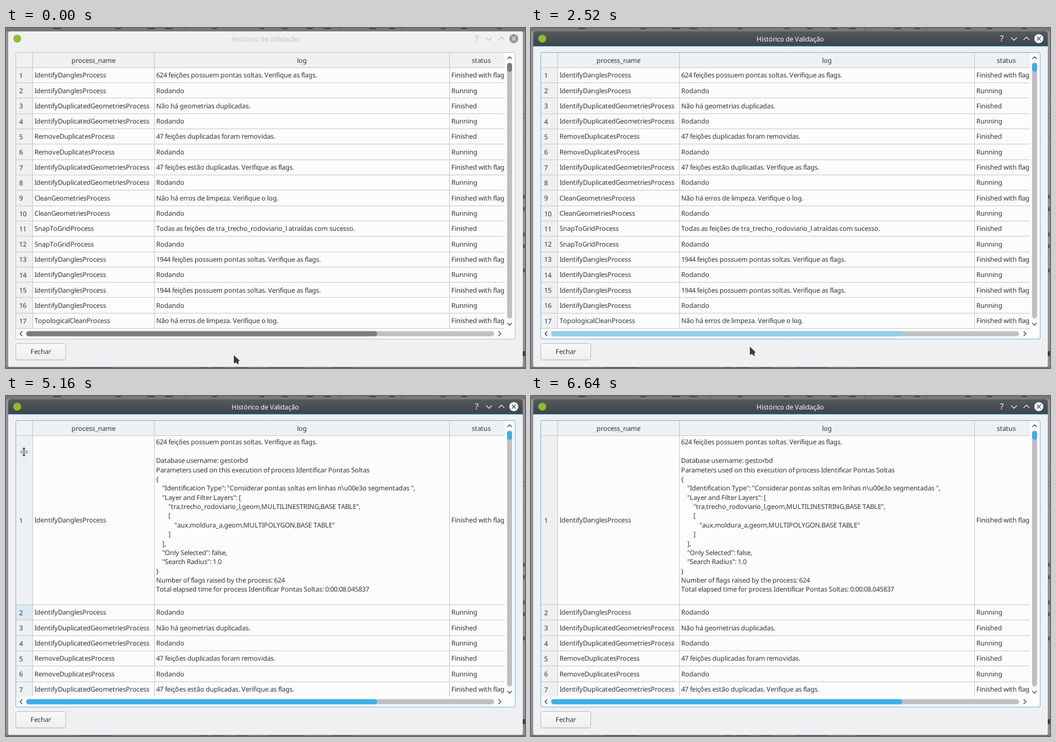
An HTML page with a canvas for the animation above (9640 ms loop, 925 px wide and 605 px high).

```html
<!DOCTYPE html>
<html lang="pt-BR">
<head>
<meta charset="utf-8">
<title>Histórico de Validação</title>
<style>
html, body { margin: 0; width: 100%; height: 100%; overflow: hidden; background: #8f9092; }
canvas { display: block; }
</style>
</head>
<body>
<canvas id="stage" width="925" height="605"></canvas>
<script>
const ctx = document.getElementById('stage').getContext('2d');
const LOOP = 9640, TICK = 40, ROW = 27.31, TOP = 70.3, TALL = 301.2, LINE = 16.38;
const ZOOM = 0.91, FONT = '13px "Noto Sans", sans-serif';
const INK = '#31363b', GRID = '#c6c7c8', BASE = '#fcfcfc', PANEL = '#eff0f1';
const GREY = [123, 124, 126], BLUE = [61, 174, 233], PALE = [147, 206, 233];

const columns = [
  { name: 'process_name', x: 48, w: 217 },
  { name: 'log', x: 265, w: 526 },
  { name: 'status', x: 791, w: 113 },
  { name: 'finished', x: 904, w: 101 }
];
const PAN = 116;                       // horizontal scroll distance

const dangles = 'IdentifyDangles', dupes = 'IdentifyDuplicatedGeometries',
  remove = 'RemoveDuplicates', clean = 'CleanGeometries', snap = 'SnapToGrid';
const FLAGS = 'Finished with flags', DONE = 'Finished';
const clear = 'Não há erros de limpeza. Verifique o log.';
const loose = n => n + ' feições possuem pontas soltas. Verifique as flags.';
const jobs = [
  [dangles, loose(624), FLAGS],
  [dupes, 'Não há geometrias duplicadas.', DONE],
  [remove, '47 feições duplicadas foram removidas.', DONE],
  [dupes, '47 feições estão duplicadas. Verifique as flags.', FLAGS],
  [clean, clear, FLAGS],
  [snap, 'Todas as feições de tra_trecho_rodoviario_l atraídas com sucesso.', DONE],
  [dangles, loose(1944), FLAGS],
  [dangles, loose(1944), FLAGS],
  ['TopologicalClean', clear, FLAGS]
];
const rows = jobs.flatMap(([job, log, status], i) => {
  const name = job + 'Process', date = '08/03/2017 10:' + (52 - i * 2);
  return [[name, log, status, date], [name, 'Rodando', 'Running', date]];
}).slice(0, 17);

const details = String.raw`${loose(624)}

Database username: gestorbd
Parameters used on this execution of process Identificar Pontas Soltas
{
    "Identification Type": "Considerar pontas soltas em linhas n\u00e3o segmentadas ",
    "Layer and Filter Layers": [
        "tra,trecho_rodoviario_l,geom,MULTILINESTRING,BASE TABLE",
        [
            "aux,moldura_a,geom,MULTIPOLYGON,BASE TABLE"
        ]
    ],
    "Only Selected": false,
    "Search Radius": 1.0
}
Number of flags raised by the process: 624
Total elapsed time for process Identificar Pontas Soltas: 0:00:08.045837`.split('\n');

// Pointer path: time, x, y, steady speed
const path = [
  [0, 406, 582], [240, 406, 582], [880, 423, 544], [1200, 423, 544], [1840, 650, 562],
  [2080, 650, 562], [2520, 390, 567], [2720, 390, 567], [3240, -13, 205], [3360, -13, 161],
  [3840, 32, 99], [5720, 32, 99], [5760, 33, 101], [5880, 80, 130], [6040, 80, 130],
  [6320, 333, 271, 1], [6640, 420, 620, 1], [LOOP, 420, 620]
];

const clamp = v => Math.max(0, Math.min(1, v));
const fade = (t, start) => clamp((t - start) / 150);
const mix = (a, b, p) => a.map((v, i) => v + (b[i] - v) * p);
const rgb = c => `rgb(${c.map(Math.round)})`;

function pointerAt(t) {
  const i = path.findIndex(k => k[0] > t);
  const [t0, x0, y0] = path[i - 1], [t1, x1, y1, steady] = path[i];
  let p = (t - t0) / (t1 - t0);
  if (!steady) p = p * p * (3 - 2 * p);
  return [x0 + (x1 - x0) * p, y0 + (y1 - y0) * p];
}

function rect(x, y, w, h, color) {
  ctx.fillStyle = color;
  ctx.fillRect(x, y, w, h);
}

function round(x, y, w, h, r, fill, stroke) {
  ctx.beginPath();
  ctx.roundRect(x, y, w, h, r);
  if (fill) { ctx.fillStyle = fill; ctx.fill(); }
  if (stroke) { ctx.strokeStyle = stroke; ctx.lineWidth = 1; ctx.stroke(); }
}

// Hinted desktop text: every glyph advances by whole pixels before zooming
const advances = {};
const advance = ch => advances[ch] ??= Math.round(ctx.measureText(ch).width);

// y is the middle of the capitals
function text(s, x, y, centered = false, color = INK) {
  const glyphs = [...String(s)];
  let dx = centered ? -glyphs.reduce((sum, ch) => sum + advance(ch), 0) / 2 : 0;
  ctx.save();
  ctx.translate(x, y + 4.1);
  ctx.scale(ZOOM, ZOOM);
  ctx.fillStyle = color;
  for (const ch of glyphs) {
    ctx.fillText(ch, dx, 0);
    dx += advance(ch);
  }
  ctx.restore();
}

function lines(points, color, width = 1.2) {
  ctx.beginPath();
  points.forEach(([x, y], i) => i ? ctx.lineTo(x, y) : ctx.moveTo(x, y));
  ctx.strokeStyle = color;
  ctx.lineWidth = width;
  ctx.stroke();
}

function chevron(x, y, dx, dy, size, color) {
  const h = size / 2;
  lines([[x - dx * h - dy * size, y - dy * h - dx * size], [x + dx * h, y + dy * h],
    [x - dx * h + dy * size, y - dy * h + dx * size]], color);
}

function backdrop() {
  rect(0, 0, 925, 605, '#929394');
  rect(0, 0, 925, 6, '#777879');
  for (const [x, w] of [[84, 14], [195, 10], [252, 14], [283, 14], [368, 8], [452, 8],
    [492, 10], [535, 12], [567, 12], [648, 12], [683, 10], [775, 8], [812, 10], [875, 8]])
    rect(x, 0, w, 2, '#444648');
  for (const x of [319, 594, 704]) rect(x, 0, 1, 5, '#555');
  for (const y of [126, 152, 160, 194]) rect(921, y, 4, 1, '#777');
  for (const y of [297, 319, 364, 385, 428]) rect(922, y, 2, 7, '#444');
  rect(921, 575, 4, 9, '#3c3d3e');
  rect(0, 603, 925, 2, '#77777a');
  for (const [x, w] of [[130, 60], [344, 14], [368, 22], [410, 20], [470, 60], [580, 40]])
    rect(x, 604, w, 1, '#754661');
}

function titleBar(t) {
  const on = fade(t, 1070);
  const tone = (a, b) => rgb(mix(a, b, on));
  const bar = ctx.createLinearGradient(0, 6, 0, 32);
  bar.addColorStop(0, tone([239, 240, 241], [83, 90, 96]));
  bar.addColorStop(1, tone([239, 240, 241], [61, 68, 74]));
  round(4, 6, 917, 597, [4, 4, 3, 3], PANEL);
  round(4, 6, 917, 26, [4, 4, 0, 0], bar);
  rect(4, 32, 917, 1, tone([239, 240, 241], BLUE));
  round(13, 12, 14, 14, 7, '#8fbf26');
  const glyph = tone([184, 188, 191], [252, 252, 252]);
  text('Histórico de Validação', 462, 19.5, true, tone([192, 195, 197], [252, 252, 252]));
  ctx.save();
  ctx.font = '15px "Noto Sans", sans-serif';
  ctx.textAlign = 'center';
  ctx.fillStyle = glyph;
  ctx.fillText('?', 839, 24.4);
  ctx.restore();
  chevron(861, 19.5, 0, 1, 5, glyph);
  chevron(883, 18.5, 0, -1, 5, glyph);
  round(897, 11, 16, 16, 8, tone([146, 150, 153], [252, 252, 252]));
  const cross = tone([239, 240, 241], [66, 73, 79]);
  lines([[901.5, 15.5], [908.5, 22.5]], cross);
  lines([[908.5, 15.5], [901.5, 22.5]], cross);
}

function table(t, [px, py], pan) {
  const open = t >= 5160, dragging = t >= 1120 && t < 2760;
  const inside = !dragging && px >= 18 && px < 889 && py >= TOP && py < 535;
  const staleHead = t >= 5160 && t < 5800;

  ctx.save();
  ctx.beginPath();
  ctx.rect(18, 44, 871, 491);
  ctx.clip();
  rect(18, 44, 871, 27, PANEL);
  rect(18, 71, 30, 464, PANEL);

  ctx.save();
  ctx.beginPath();
  ctx.rect(48, 44, 841, 491);
  ctx.clip();
  ctx.translate(-pan, 0);
  for (const c of columns) text(c.name, c.x + (c.w - 1) / 2, 58, true);
  ctx.restore();

  let y = TOP;
  rows.forEach((row, i) => {
    const h = open && !i ? TALL : ROW, mid = y + h / 2;
    const top = Math.floor(y) + 1, bottom = Math.floor(y + h);
    const over = inside && py >= y && py < y + h;
    if (staleHead ? i === 1 : over && px < 48) rect(18, top, 29, bottom - top, '#dbeaf2');
    text(i + 1, 23.6, mid + 0.7);

    ctx.save();
    ctx.beginPath();
    ctx.rect(48, 71, 841, 464);
    ctx.clip();
    ctx.translate(-pan, 0);
    columns.forEach((c, j) => {
      const cx = px + pan;
      if (over && px >= 48 && cx >= c.x && cx < c.x + c.w)
        rect(c.x, top, c.w - 1, bottom - top, '#d6ebf7');
      if (open && !i && j === 1)
        details.forEach((s, n) => text(s, c.x + 2.6, 82.3 + n * LINE));
      else text(row[j], c.x + 2.7, mid + 0.2);
    });
    ctx.restore();
    rect(18, bottom, 871, 1, GRID);
    y += h;
  });

  rect(18, 70, 871, 1, GRID);
  rect(47, 44, 1, 491, GRID);
  for (const c of columns) {
    const edge = c.x + c.w - 1 - pan;
    if (edge > 48) rect(edge, 44, 1, 491, GRID);
  }
  ctx.restore();
}

function scrollBars(t, pan) {
  const hover = fade(t, 690);
  const handle = t < 2760 ? mix(GREY, PALE, hover) : mix(PALE, BLUE, fade(t, 2740));
  round(36, 539.5, 834, 9, 4.5, '#bfc0c1');
  round(pan ? 244.5 : 36, 539.5, 625.5, 9, 4.5, rgb(handle));
  round(893, 62, 9, 455, 4.5, '#bfc0c1');
  round(893, 62, 9, 16, 4.5, rgb(mix(GREY, BLUE, fade(t, 1070))));
  chevron(27, 544, -1, 0, 4, INK);
  chevron(880, 544, 1, 0, 4, INK);
  chevron(897.5, 53, 0, -1, 4, INK);
  chevron(897.5, 527, 0, 1, 4, INK);
}

function button() {
  const face = ctx.createLinearGradient(0, 562, 0, 590);
  face.addColorStop(0, '#f8f8f9');
  face.addColorStop(1, '#eeeff0');
  round(17.5, 562.5, 89, 29, 3, '#d9dadb');
  round(17.5, 561.5, 89, 29, 3, face, '#b9babb');
  text('Fechar', 62, 576, true);
}

function polygon(points, x, y) {
  ctx.beginPath();
  for (const [dx, dy] of points) ctx.lineTo(x + dx, y + dy);
  ctx.closePath();
  ctx.strokeStyle = 'rgba(255,255,255,.75)';
  ctx.lineWidth = 1.4;
  ctx.stroke();
  ctx.fillStyle = '#3b3c3f';
  ctx.fill();
}

function pointer(t, [x, y]) {
  if (t < 3840 || t >= 5760) {
    polygon([[0, 0], [0, 15], [3.5, 13], [8.5, 17.5], [8, 11.5], [10.5, 10]], x, y);
    return;
  }
  for (const s of [-1, 1]) {
    polygon([[-7, s], [7, s], [7, s * 2], [0.7, s * 2], [0.7, s * 5], [3, s * 5], [0, s * 8.5],
      [-3, s * 5], [-0.7, s * 5], [-0.7, s * 2], [-7, s * 2]], x, y + 0.5);
  }
}

function draw(now) {
  const t = Math.floor((now % LOOP) / TICK) * TICK;
  const at = pointerAt(t);
  const pan = t >= 1120 && t < 2760 && at[0] - 423 > 104 ? PAN : 0;
  ctx.font = FONT;
  ctx.textRendering = 'geometricPrecision';
  backdrop();
  titleBar(t);
  round(17.5, 43.5, 890, 510, 2.5, BASE);
  table(t, at, pan);
  scrollBars(t, pan);
  round(17.5, 43.5, 890, 510, 2.5, null, rgb(mix([189, 190, 191], [104, 183, 221], fade(t, 690))));
  button();
  pointer(t, at);
}

const start = performance.now();
function frame() {
  draw(performance.now() - start);
  requestAnimationFrame(frame);
}
frame();
</script>
</body>
</html>
```
